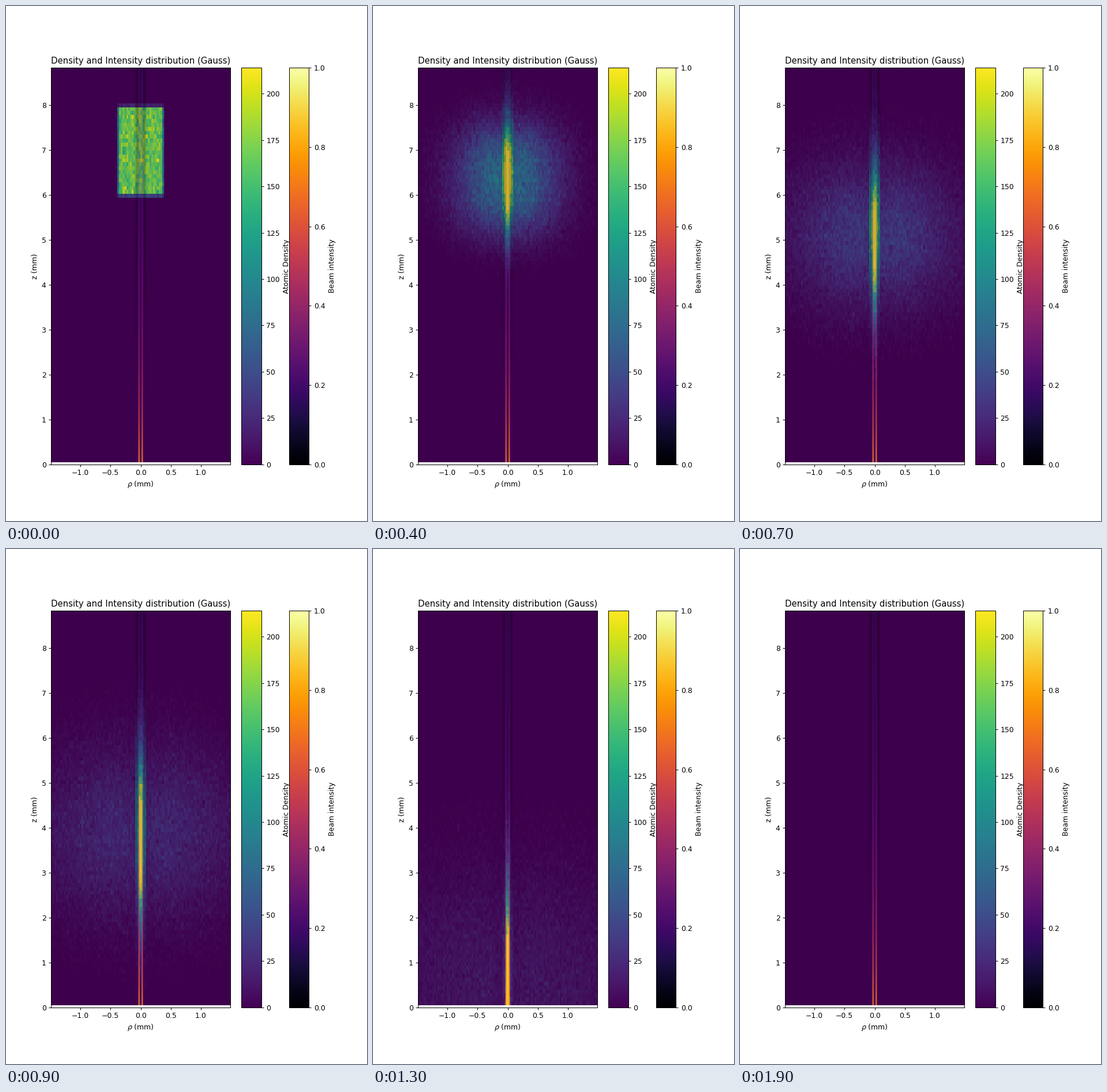
Write a matplotlib script that moves like this. It is 626x894 px and loops after 2100 ms.

```python
import math

import matplotlib.pyplot as plt
import numpy as np
from matplotlib.animation import FuncAnimation
from matplotlib.cm import ScalarMappable
from matplotlib.colors import Normalize

STEP_MS = 100
FRAMES = 21
LAST = 19               # the final picture is held for two steps
BINS = 100
R_MAX, Z_MIN, Z_MAX = 1.486, 0.045, 8.826
PEAK = 214
MEAN = 168              # atoms per bin in the initial cloud

erf = np.vectorize(math.erf)


def centers(lo, hi, n):
    return lo + (np.arange(n) + 0.5) * (hi - lo) / n


rho = centers(-R_MAX, R_MAX, BINS)
z = centers(Z_MIN, Z_MAX, BINS)


def spread_box(x, lo, hi, sigma):
    """Uniform box blurred by a thermal velocity spread."""
    s = sigma * math.sqrt(2)
    return 0.5 * (erf((x - lo) / s) - erf((x - hi) / s))


def bell(x, mid, sigma):
    return np.exp(-0.5 * ((x - mid) / sigma) ** 2)


def density(t):
    """Atom counts: a falling, expanding cloud plus the guided atoms."""
    rng = np.random.default_rng(40 + t)
    fall = 0.038 * t * t
    sigma = math.hypot(0.015, 0.125 * t)

    across = spread_box(rho, -0.371, 0.371, sigma)
    across = across * (1 - 0.035 * min(t, 10) * np.exp(-(rho / 0.25) ** 2))
    along = spread_box(z, 5.98 - fall, 7.975 - fall, sigma)
    mean = MEAN * np.outer(along, across)

    mid, width = 7 - fall, 0.55 + 0.07 * t
    caught = min(1, t / 3)
    core = (170 + 10 * t) * caught * bell(z, mid - 0.02 * t, width)
    halo = 150 * caught * min(1, max(0, (14 - t) / 8))
    skirt = halo * bell(z, mid + 0.03 * t, width)
    r = np.abs(rho)
    mean += np.outer(core, r < 0.03)
    mean += np.outer(skirt, (r > 0.03) & (r < 0.06))
    mean += np.outer(0.6 * skirt, (r > 0.06) & (r < 0.09))

    mean[mean < 0.7] = 0
    return rng.poisson(mean)


def beam_layer():
    """Hollow beam as a translucent layer: bright walls, dark surroundings."""
    x = np.abs(centers(-R_MAX, R_MAX, 620))[None, :]
    h = centers(Z_MIN, Z_MAX, 400)[:, None]

    def wall(width):
        return np.exp(-((x - 0.024) / width) ** 2)

    level = 0.8 * np.exp(-h / 4.8) * wall(0.022)
    shade = 0.26 * np.clip((h - 1) / 4, 0, 1) * np.exp(-(x / 0.085) ** 6)
    shade = shade * (1 - 0.5 * np.exp(-(x / 0.028) ** 4))
    glow = (0.3 + 0.6 * np.exp(-h / 3)) * wall(0.014)
    layer = plt.get_cmap("inferno")(level)
    layer[..., 3] = np.clip(np.maximum(0.1 + shade, glow), 0, 1)
    return layer


# 626 x 894 pixels; the small excess guards against rounding down
fig, ax = plt.subplots(figsize=(7.003, 10.001), dpi=89.4)
extent = (-R_MAX, R_MAX, Z_MIN, Z_MAX)
style = dict(origin="lower", extent=extent, aspect="auto",
             interpolation="nearest")
atoms = ax.imshow(density(0), cmap="viridis", vmin=0, vmax=PEAK, **style)
ax.imshow(beam_layer(), **style)

light = ScalarMappable(Normalize(0, 1), "inferno")
fig.colorbar(light, ax=ax, label="Beam intensity")
fig.colorbar(atoms, ax=ax, label="Atomic Density")

ax.set_xlim(-R_MAX, R_MAX)
ax.set_ylim(0, Z_MAX)
ax.set_xticks(np.arange(-1, 1.1, 0.5))
ax.set_yticks(range(9))
ax.set_xlabel(r"$\rho$ (mm)")
ax.set_ylabel("z (mm)")
ax.set_title("Density and Intensity distribution (Gauss)")


def update(i):
    atoms.set_data(density(min(i, LAST)))
    return (atoms,)


anim = FuncAnimation(fig, update, frames=FRAMES, interval=STEP_MS,
                     repeat=True, repeat_delay=0, blit=False)
plt.show()
```
